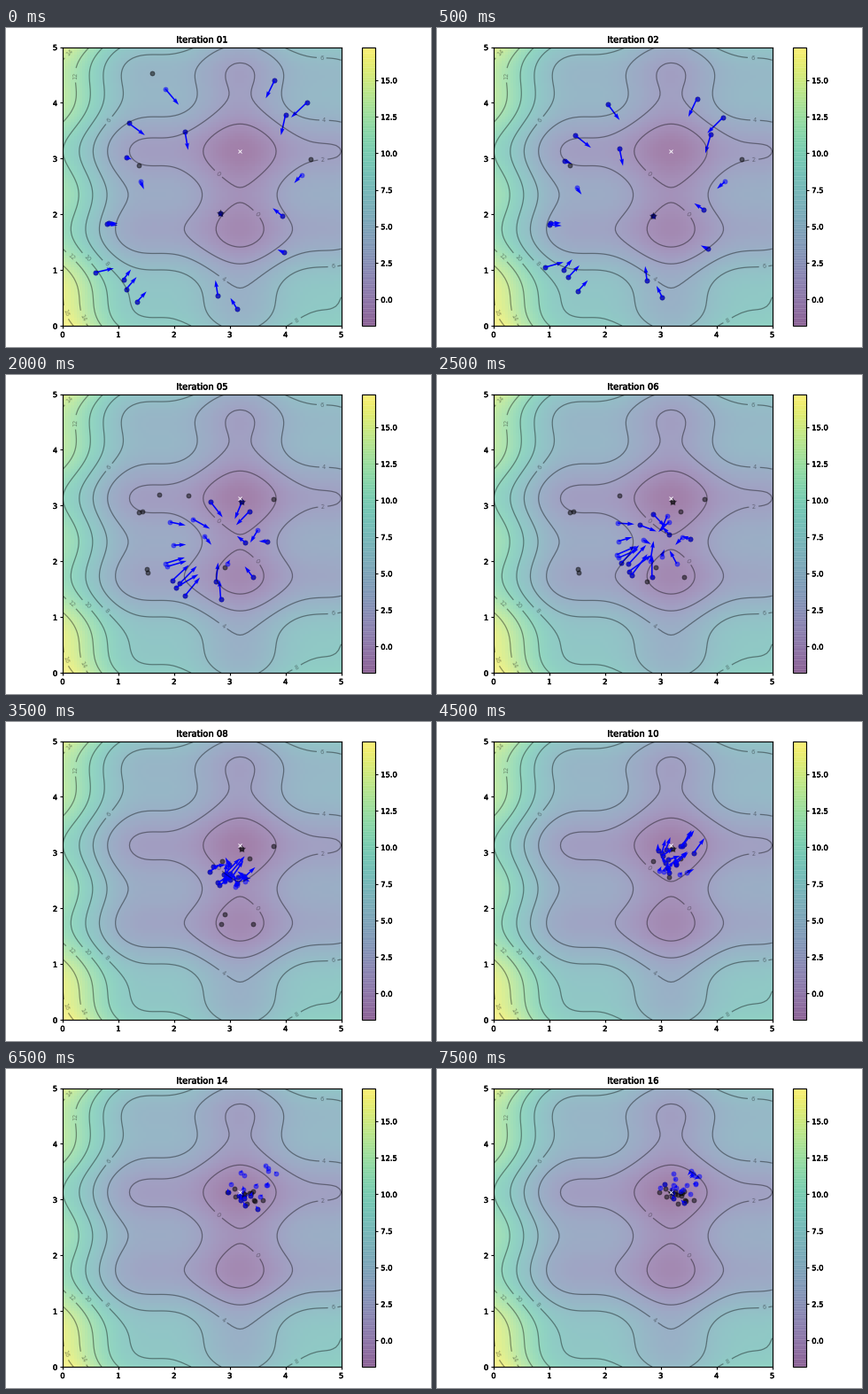
These frames come from a looping animation (480 by 360 pixels, 8 s). A matplotlib script:

```python
import numpy as np
import matplotlib.pyplot as plt
from matplotlib import patheffects
from matplotlib.animation import FuncAnimation

N_FRAMES, N_PARTICLES = 16, 20
C1 = C2 = 0.1
W = 0.8

plt.rcParams.update({
    "axes.linewidth": 1.4,
    "xtick.major.width": 1.4,
    "ytick.major.width": 1.4,
})


def f(x, y):
    """Objective function to minimise."""
    return ((x - 3.14) ** 2 + (y - 2.72) ** 2
            + np.sin(3 * x + 1.41) + np.sin(4 * y - 1.73))


def run_swarm(steps):
    """Return (X, V, pbest, gbest) after each particle swarm update."""
    rng = np.random.RandomState(100)
    X = rng.rand(2, N_PARTICLES) * 5
    V = rng.randn(2, N_PARTICLES) * 0.1
    pbest, pbest_obj = X.copy(), f(*X)
    gbest = pbest[:, pbest_obj.argmin()].copy()
    states = []
    for _ in range(steps):
        r1, r2 = rng.rand(2)
        V = W * V + C1 * r1 * (pbest - X) + C2 * r2 * (gbest[:, None] - X)
        X = X + V
        obj = f(*X)
        better = pbest_obj >= obj
        pbest[:, better] = X[:, better]
        pbest_obj = np.minimum(pbest_obj, obj)
        gbest = pbest[:, pbest_obj.argmin()].copy()
        states.append((X, V, pbest.copy(), gbest))
    return states


def draw_striped_bar(cbar, rows=628, steps=256):
    """Fill the colour bar with translucent cells that overlap by one row."""
    cell = np.arange(rows) * steps // rows
    rgba = cbar.cmap(cell)
    rgba[:, 3] = np.where(np.diff(cell, prepend=0) > 0, 0.75, 0.5)
    cbar.solids.set_visible(False)
    cbar.ax.imshow(rgba[:, None], origin="lower", aspect="auto",
                   extent=[0, 1, cbar.vmin, cbar.vmax])


# The view starts one update into the search.
states = run_swarm(N_FRAMES + 1)[1:]
X, V, pbest, gbest = states[0]

x, y = np.meshgrid(np.linspace(0, 5, 100), np.linspace(0, 5, 100))
z = f(x, y)
x_min, y_min = x.ravel()[z.argmin()], y.ravel()[z.argmin()]

# Contour labels are placed at 100 dpi; the figure is scaled to 480 x 360 below.
fig, ax = plt.subplots(figsize=(8, 6), dpi=100)
img = ax.imshow(z, extent=[0, 5, 0, 5], origin="lower", cmap="viridis", alpha=0.5)
cbar = fig.colorbar(img, ax=ax)
draw_striped_bar(cbar)
ax.plot([x_min], [y_min], marker="x", markersize=5, color="white")
contours = ax.contour(x, y, z, 10, colors="black", alpha=0.4, algorithm="mpl2014")
ax.clabel(contours, inline=True, fontsize=8, fmt="%.0f")
pbest_plot = ax.scatter(*pbest, marker="o", color="black", alpha=0.5)
p_plot = ax.scatter(*X, marker="o", color="blue", alpha=0.5)
p_arrow = ax.quiver(*X, *V, color="blue", width=0.005,
                    angles="xy", scale_units="xy", scale=1)
gbest_plot = ax.scatter(*gbest, marker="*", s=100, color="black", alpha=0.4)
ax.set_xlim(0, 5)
ax.set_ylim(0, 5)
title = ax.set_title("Iteration 01")

# Lay out at double resolution for finer text metrics.
fig.set_dpi(120)
fig.tight_layout()
fig.set_dpi(60)

heavy = [patheffects.withStroke(linewidth=0.6, foreground="black")]
for text in [title, *ax.get_xticklabels(), *ax.get_yticklabels(),
             *cbar.ax.get_yticklabels()]:
    text.set_path_effects(heavy)


def animate(i):
    X, V, pbest, gbest = states[i]
    title.set_text(f"Iteration {i + 1:02d}")
    pbest_plot.set_offsets(pbest.T)
    p_plot.set_offsets(X.T)
    p_arrow.set_offsets(X.T)
    p_arrow.set_UVC(*V)
    gbest_plot.set_offsets(gbest[None, :])
    return title, pbest_plot, p_plot, p_arrow, gbest_plot


anim = FuncAnimation(fig, animate, frames=N_FRAMES, interval=500, blit=False, repeat=True)
plt.show()
```
